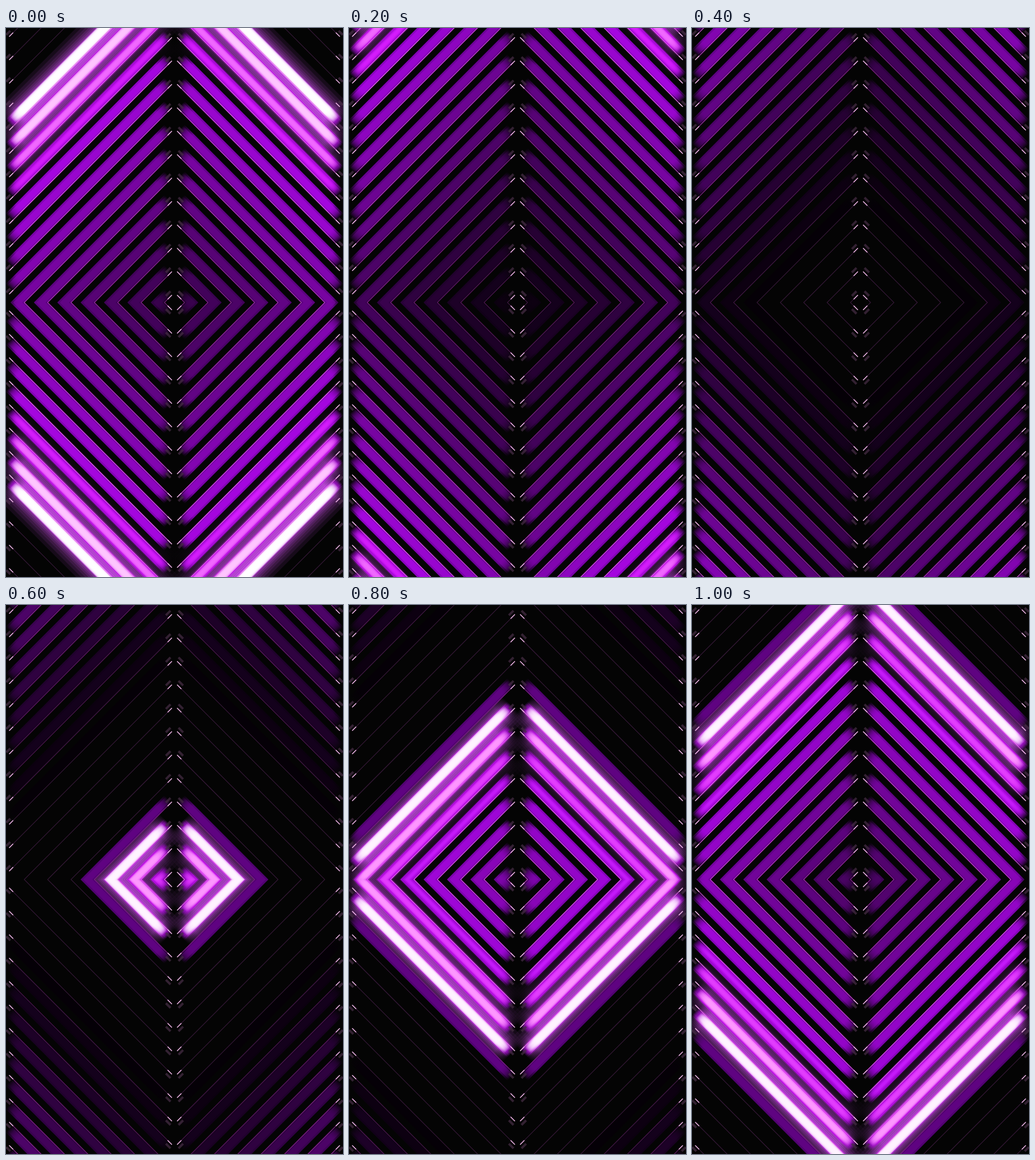
These frames come from a looping animation (587 px wide and 954 px high, 1100 ms). An HTML page with a canvas:

```html
<!DOCTYPE html>
<html lang="en">
<head>
<meta charset="utf-8">
<title>Neon diamonds</title>
<style>
  html, body { margin: 0; width: 100%; height: 100%; overflow: hidden; background: #040404; }
  canvas { display: block; }
</style>
</head>
<body>
<canvas id="stage" width="587" height="954"></canvas>
<script>
const ctx = document.getElementById('stage').getContext('2d');
const CX = 293.5, CY = 477;
const RINGS = 19, GAP = 40.7, FIRST = 17.5, MID = 11.5;
const STEP = 100, STEPS = 11;     // the picture holds for each step
const PERIOD = 26.5, SPEED = 2.5; // in rings: between waves, per step

const clamp = (v, lo = 0, hi = 1) => Math.min(hi, Math.max(lo, v));
const rgba = (c, a) => `rgba(${c.map(Math.round)},${a})`;
const scale = (c, s) => c.map(v => v * s);

// Diagonal p + q = sum, where p and q are distances from the centre axes
function diagonal(sum, from, to, width, style) {
  ctx.lineWidth = width;
  ctx.strokeStyle = style;
  ctx.beginPath();
  ctx.moveTo(from, sum - from);
  ctx.lineTo(to, sum - to);
  ctx.stroke();
}

// Tube layer with soft ends
function tube(sum, width, color, alpha = 1, inset = 0) {
  const from = 11 + inset, to = 288 - inset;
  const g = ctx.createLinearGradient(from, sum - from, to, sum - to);
  for (const [px, a] of [[0, 0], [7, 0.45], [17, 1]]) {
    const at = px / (to - from), style = rgba(color, a * alpha);
    g.addColorStop(at, style);
    g.addColorStop(1 - at, style);
  }
  diagonal(sum, from, to, width, g);
}

// Time since the wave front passed, in rings; slightly negative just ahead of it
function ageOf(ring, step) {
  const age = (14 + SPEED * step - ring + PERIOD) % PERIOD;
  return age >= PERIOD - 0.5 ? age - PERIOD : age;
}

function drawHalo(mid, age) {
  if (age < 0 || age > 3.5) return;
  const power = clamp(1.15 - age * 0.36);
  for (const w of [70, 58, 48, 40, 33, 27, 22]) tube(mid, w, [19, 7, 22], power);
}

function drawBody(mid, age) {
  const fade = age < 0 ? 0.58 : clamp((21 - age) / 17) ** 1.2;
  tube(mid, 17.6, scale([140, 4, 194], fade), fade && 1);
  tube(mid, 11, scale([164, 6, 222], fade), fade && 1);
  if (age < 0 || age >= 4) return;

  const heat = clamp((4 - age) / 2.5);
  tube(mid, 21, [205, 20, 245], 0.35 * heat, 1);
  tube(mid, 17, [225, 30, 250], 0.6 * heat, 2);
  const core = [190 + 65 * heat, clamp(290 - 90 * age, 30, 255), 255];
  const width = 19 - 3.2 * age;
  for (let i = 0; i < 6; i++) tube(mid, width * (1 - i / 8), core, 0.6 - 0.11 * age, 6);
}

function drawTrim(r, age) {
  const lit = age < 0 ? 0.4 : clamp((20 - age) / 16);
  diagonal(r, 8, 286, 1.1, rgba([62 + 175 * lit, 28 + 85 * lit ** 2, 64 + 172 * lit], 0.9));
  const cap = 'rgba(72,46,70,.7)';
  diagonal(r + 9, 7, 15, 4, cap);
  diagonal(r + 8, 286, 293, 4, cap);
  const tick = 'rgb(248,190,240)';
  diagonal(r, 4.5, 12, 1.4, tick);
  diagonal(r, 281, 288, 1.4, tick);
}

function draw(step) {
  ctx.fillStyle = '#040404';
  ctx.fillRect(0, 0, 587, 954);
  const rings = Array.from({ length: RINGS }, (_, k) => ({ r: FIRST + GAP * k, age: ageOf(k, step) }));

  for (const sx of [-1, 1]) for (const sy of [-1, 1]) {
    ctx.save();
    ctx.translate(CX, CY);
    ctx.scale(sx, sy);
    ctx.beginPath();
    ctx.rect(-40, 0, 340, 480);
    ctx.clip();
    ctx.globalCompositeOperation = 'lighter';
    for (const { r, age } of rings) drawHalo(r + MID, age);
    ctx.globalCompositeOperation = 'source-over';
    for (const { r, age } of rings) drawBody(r + MID, age);
    for (const { r, age } of rings) drawTrim(r, age);
    ctx.restore();
  }
}

const start = performance.now();
let shown = -1;
function tick() {
  const step = Math.floor((performance.now() - start) / STEP) % STEPS;
  if (step !== shown) draw(shown = step);
  requestAnimationFrame(tick);
}
tick();
</script>
</body>
</html>
```
